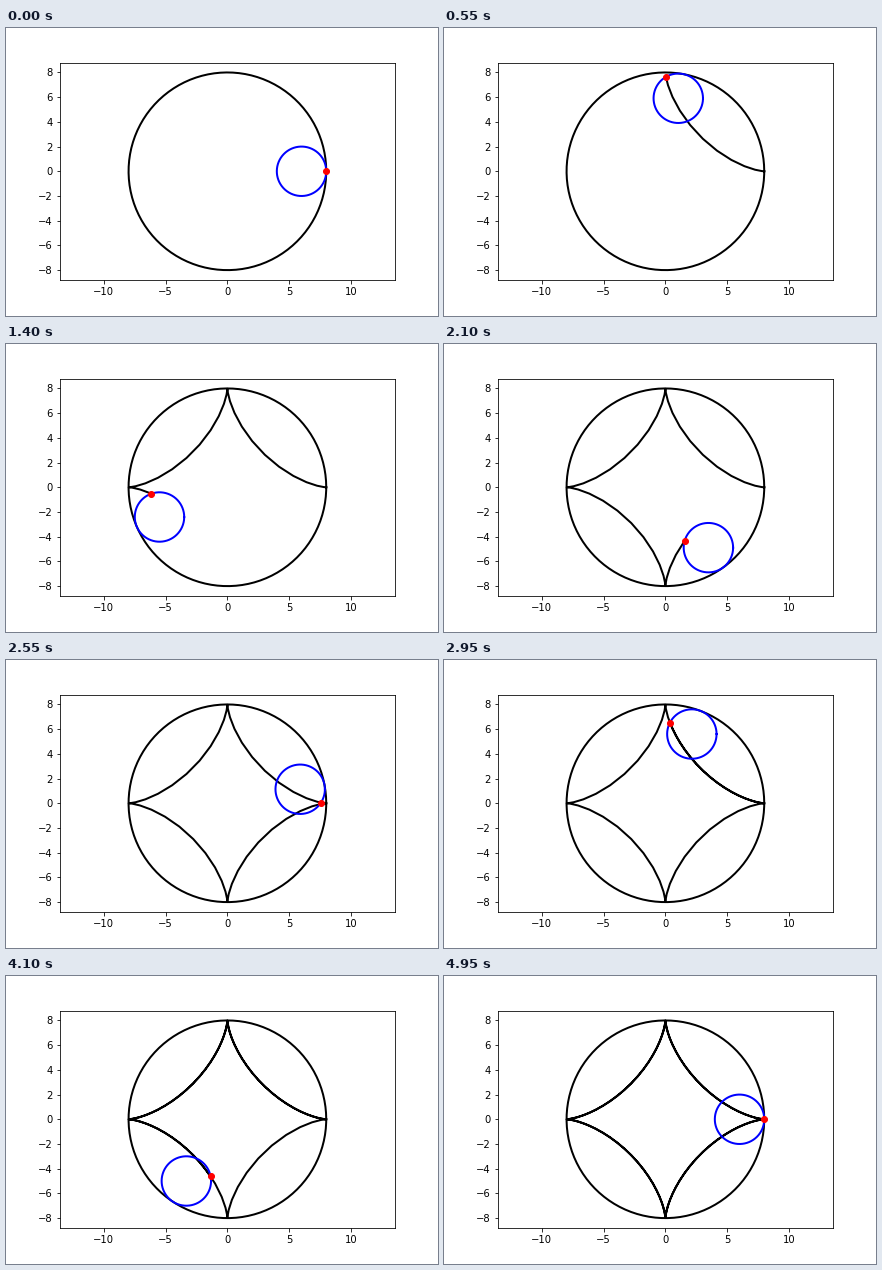
Write a matplotlib script that moves like this. It is 432 px wide and 288 px high and loops after 5000 ms.

```python
import numpy as np
import matplotlib.pyplot as plt
from matplotlib.animation import FuncAnimation

FRAMES = 100
INTERVAL = 50
R, r = 8, 2  # fixed and rolling circle radii


def circle(cx, cy, radius, points=200):
    t = np.linspace(0, 2 * np.pi, points)
    return cx + radius * np.cos(t), cy + radius * np.sin(t)


# Two turns of the small circle inside the big one
theta = np.linspace(0, 4 * np.pi, FRAMES)
center_x = (R - r) * np.cos(theta)
center_y = (R - r) * np.sin(theta)
spin = (R - r) / r * theta
pen_x = center_x + r * np.cos(spin)
pen_y = center_y - r * np.sin(spin)

fig, ax = plt.subplots(figsize=(6, 4), dpi=72)
fig.subplots_adjust(left=0.125, right=0.9, bottom=0.125, top=0.88)

half_height = 1.1 * R
box = ax.get_window_extent()
half_width = half_height * box.width / box.height
ax.set_xlim(-half_width, half_width)
ax.set_ylim(-half_height, half_height)
ax.set_xticks(range(-10, 11, 5))
ax.set_yticks(range(-8, 9, 2))

ax.plot(*circle(0, 0, R), "k-", lw=2)
trace, = ax.plot([], [], "k-", lw=2)
wheel, = ax.plot([], [], "b-", lw=2)
pen, = ax.plot([], [], "ro", ms=6)


def update(i):
    trace.set_data(pen_x[:i + 1], pen_y[:i + 1])
    wheel.set_data(*circle(center_x[i], center_y[i], r))
    pen.set_data([pen_x[i]], [pen_y[i]])
    return trace, wheel, pen


anim = FuncAnimation(fig, update, frames=FRAMES, interval=INTERVAL,
                     repeat=True, repeat_delay=0)
plt.show()
```
